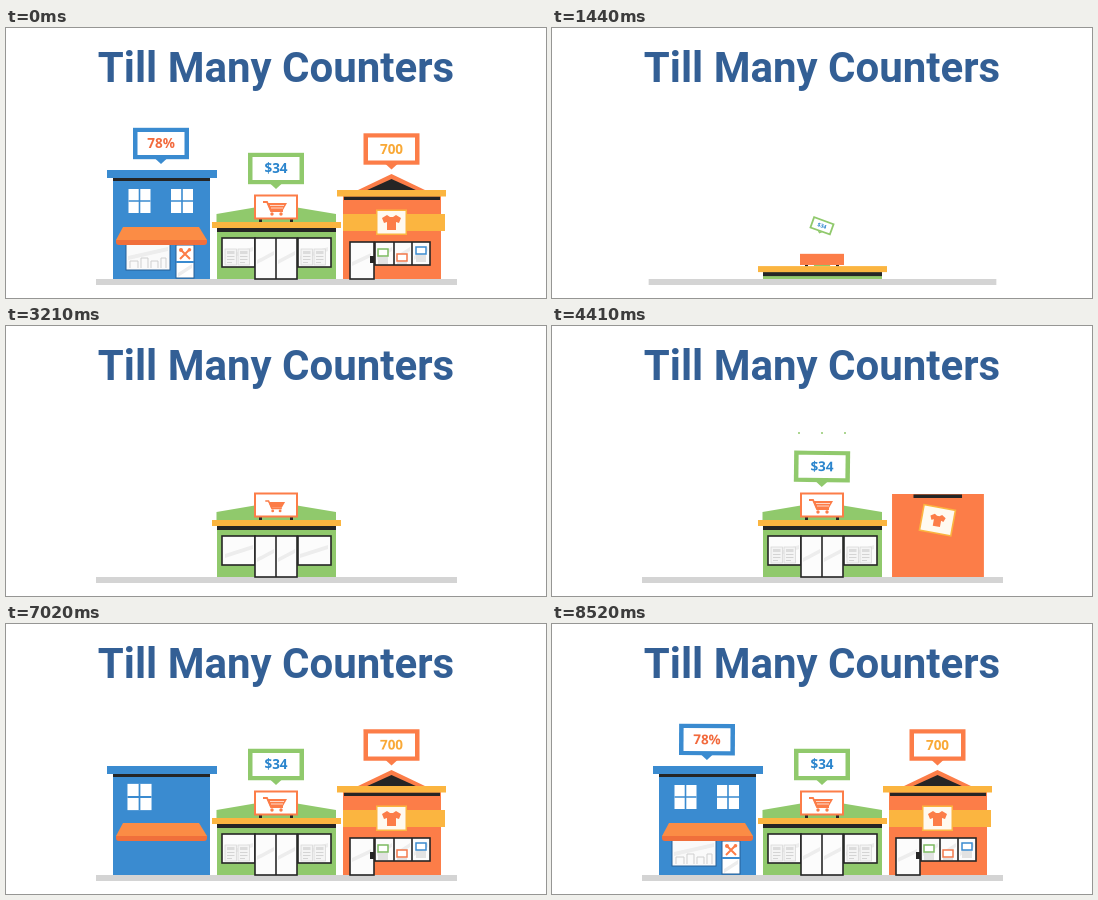
Write an HTML page that moves like this. It is 540x270 px and loops after 8550 ms.

```html
<!DOCTYPE html>
<html lang="en">
<head>
<meta charset="utf-8">
<title>Till Many Counters</title>
<style>
  html, body { margin: 0; width: 100%; height: 100%; overflow: hidden; background: #fff; }
  svg { display: block; width: 540px; height: 270px; }
  .title { font: 700 42px Roboto, sans-serif; fill: #335f95; text-anchor: middle; }
  .tag { font: 700 13.5px "Open Sans", sans-serif; text-anchor: middle; }
</style>
</head>
<body>
<svg id="stage" viewBox="0 0 540 270"></svg>
<script>
const LOOP = 8550, EMPTY = 1950, FLOOR = 251;
const BLUE = '#3a8bd0', GREEN = '#90c96c', ORANGE = '#fc7d48', YELLOW = '#fbb540', DARK = '#252525';

// Drawing helpers
const rect = (x, y, w, h, fill, more = '') =>
  `<rect x="${x}" y="${y}" width="${w}" height="${h}" fill="${fill}" ${more}/>`;
const poly = (points, fill) => `<polygon points="${points}" fill="${fill}"/>`;
const line = (d, color, width = 1) =>
  `<path d="${d}" fill="none" stroke="${color}" stroke-width="${width}"/>`;
const group = (id, ...kids) => `<g id="${id}">${kids.join('')}</g>`;

const pane = (x, y, w, h, width = 1.6) =>
  rect(x, y, w, h, '#fcfcfc', `stroke="${DARK}" stroke-width="${width}"`);
const sheen = (x, y, w) =>
  poly(`${x},${y + 9} ${x + w},${y} ${x + w},${y + 4} ${x},${y + 13}`, '#ededed');
const paper = (x, y) =>
  rect(x, y, 11.5, 16, '#f4f4f4', 'stroke="#d8d8d8" stroke-width=".8"') +
  rect(x + 2, y + 2, 7.5, 3, '#dcdcdc') +
  line(`M${x + 2} ${y + 7.5}h7.5m-7.5 3h7.5m-7.5 3h5`, '#d4d4d4');
const ticket = (x, y, color, tail) =>
  rect(x, y, 10, 7, '#fff', `stroke="${color}" stroke-width="1.5"`) +
  rect(x, y + 8, 10, tail, '#e2e2e2');
const houseWindow = x =>
  rect(x, 161, 22, 24, '#fff') + line(`M${x + 11} 161v24M${x} 173h22`, BLUE, 1.6);

const cart = line('M257 174h4l4 9h12', ORANGE, 1.8) +
  poly('261,175 281,175 277,182 264,182', ORANGE) +
  `<g fill="${ORANGE}"><circle cx="266" cy="186" r="1.7"/><circle cx="275" cy="186" r="1.7"/></g>`;
const shirt = poly('381,187 376,190 378,195 381,194 381,202 390,202 390,194 393,195 395,190 390,187 387,189 384,189', ORANGE);
const cutlery = line('M174 221l10 10M184 221l-10 10', ORANGE, 2) +
  `<g fill="${ORANGE}"><circle cx="175" cy="222" r="2"/><circle cx="183.5" cy="221.7" r="1.8"/></g>`;

const bubbles = [
  { id: 'b1', x: 155, y: 115.5, from: 150, color: BLUE, text: '78%', ink: '#f26a3d', start: 7400, end: 800, top: 'blueTop' },
  { id: 'b2', x: 270, y: 140.5, from: 192, color: GREEN, text: '$34', ink: '#2b85cd', start: 3580, end: 1220, top: 'greenTop' },
  { id: 'b3', x: 385.5, y: 121, from: 160, color: ORANGE, text: '700', ink: '#f9a937', start: 5560, end: 620, top: 'orangeTop' }
];
const bubbleArt = b => group(b.id,
  poly('-6,15 6,15 0,20.5', b.color),
  rect(-28, -15.7, 56, 31.4, b.color), rect(-23.5, -11.5, 47, 23, '#fff'),
  `<text class="tag" y="4.6" fill="${b.ink}">${b.text}</text>`);
const dotArt = b => `<g id="${b.id}dots" fill="${b.color}">` + '<circle/>'.repeat(3) + '</g>';

document.getElementById('stage').innerHTML = [
  '<text class="title" x="270" y="54">Till Many Counters</text>',
  group('ground', rect(90, 251, 361, 6, '#d4d4d4')),

  group('greenFill',
    group('greenBody', rect(211, 194, 119, 57, GREEN)),
    group('greenLeft', pane(216, 210, 33, 29), sheen(219, 219, 28)),
    group('greenRight', pane(292, 210, 33, 29), sheen(294, 219, 28)),
    group('greenPapers', paper(219, 221), paper(232, 221), paper(295, 221), paper(308, 221)),
    group('greenDoor', pane(249, 210, 42, 41), sheen(251, 223, 17), sheen(272, 223, 17),
      line('M270 210v41', DARK, 1.6))),
  group('greenTop',
    group('hump', poly('210.5,195 210.5,186 258,178 270,176.5 282,178 330,186 330,195', GREEN)),
    group('greenShade', rect(211, 200, 119, 4, DARK)),
    group('greenRoof', rect(206, 194, 129, 6, YELLOW)),
    group('cartSign', rect(253, 190, 3, 4, DARK), rect(284, 190, 3, 4, DARK),
      rect(248, 166.5, 44, 25, ORANGE),
      group('cartFace', rect(250, 168.5, 40, 21, '#fff'),
        group('cart', cart, group('cartGrid', line('M264 177.5h14M265 180h12', '#fff', .7)))))),

  group('orangeFill',
    group('orangeBody', rect(337, 168, 98, 83, ORANGE)),
    group('orangeWindow', pane(369, 214, 55, 23), line('M388 214v23M406 214v23', DARK, 1.6),
      sheen(371, 219, 15), sheen(390, 219, 14), sheen(408, 219, 14)),
    group('orangePapers', ticket(372, 221, '#7dbb62', 7), ticket(391, 226, '#f2784b', 2),
      ticket(410, 219, BLUE, 7)),
    group('orangeDoor', pane(344, 214, 24, 37), sheen(346, 225, 19), rect(364, 228, 4, 7, DARK))),
  group('orangeTop',
    group('gable', poly('350,163 385.5,146 421,163', ORANGE), poly('359,163 385.5,151 412,163', DARK)),
    group('orangeShade', rect(338, 168.5, 96, 3.5, DARK)),
    group('orangeRoof', rect(331, 162, 109, 6.5, YELLOW)),
    group('band', rect(337, 186, 102, 17, YELLOW)),
    group('shirtSign', rect(370, 181.5, 31, 25.5, YELLOW), rect(371.5, 183, 28, 22.5, '#fffaf0'),
      group('shirt', shirt))),

  group('blueFill',
    group('blueBody', rect(107, 150, 97, 101, BLUE)),
    group('blueLeft', houseWindow(122.5)),
    group('blueRight', houseWindow(165)),
    group('cafe', rect(120, 216, 44, 26, '#fafafa', 'stroke="#255f96"'), sheen(122, 219, 40),
      line('M124 240v-7h8v7m3 0v-10h7v10m3 0v-7h7v7m3 0v-10h5v10', '#cfcfcf')),
    group('cafeDoor', rect(170, 217, 18, 33, '#fff', 'stroke="#255f96"'),
      line('M170 234h18', BLUE, 2), sheen(172, 236, 14), cutlery),
    group('awning', poly('117,199 193,199 201,212 110,212', '#fb8c45'),
      '<path d="M110 212h91v2q0 3-3 3H113q-3 0-3-3z" fill="#f06f3b"/>')),
  group('blueTop',
    group('blueShade', rect(107, 150, 97, 3, DARK)),
    group('blueRoof', rect(101, 142, 110, 8, BLUE))),
  bubbles.map(b => bubbleArt(b) + dotArt(b)).join('')
].join('');

// Timing helpers
const clamp = v => Math.min(1, Math.max(0, v));
const quad = p => p < .5 ? 2 * p * p : 1 - 2 * (1 - p) ** 2;
const cubic = p => p < .5 ? 4 * p ** 3 : 1 - 4 * (1 - p) ** 3;
const back = p => 1 + 2.7 * (p - 1) ** 3 + 1.7 * (p - 1) ** 2;
const at = (t, start, length) => clamp((t - start) / length);
const leaving = t => t < EMPTY;

const el = id => document.getElementById(id);
function place(id, x, y, sx, sy, turn = 0) {
  const node = el(id);
  node.setAttribute('display', sx > .002 && sy > .002 ? 'inline' : 'none');
  node.setAttribute('transform',
    `translate(${x} ${y}) rotate(${turn}) scale(${sx} ${sy}) translate(${-x} ${-y})`);
}

// id, pivot x, pivot y, axes (s: both, w: both with a swing), start and length in, start and length out
const parts = [
  ['greenLeft', 232, 224, 's', 2850, 250, 1120, 280],
  ['greenRight', 308, 224, 's', 2900, 250, 1120, 280],
  ['greenDoor', 270, 251, 'y', 2780, 300, 1120, 280],
  ['greenPapers', 270, 229, 'y', 3300, 350, 1000, 250],
  ['hump', 270, 194, 's', 2700, 250, 1145, 400],
  ['greenShade', 270, 202, 'x', 2640, 300, 1500, 170],
  ['greenRoof', 270, 197, 'x', 2600, 300, 1520, 180],
  ['cartSign', 270, 194, 'y', 2920, 240, 1230, 400],
  ['cartFace', 270, 179, 's', 2960, 220, 1130, 270],
  ['cart', 270, 180, 's', 3135, 300, 1100, 270],
  ['cartGrid', 271, 179, 's', 3300, 250, 1100, 270],
  ['orangeWindow', 396, 225, 's', 5100, 300, 800, 250],
  ['orangeDoor', 356, 251, 'y', 4950, 300, 820, 250],
  ['orangePapers', 396, 229, 's', 6400, 350, 650, 200],
  ['gable', 385.5, 163, 'y', 4900, 320, 780, 250],
  ['orangeShade', 385.5, 169, 'x', 4230, 360, 1180, 180],
  ['orangeRoof', 385.5, 165, 'x', 4690, 320, 1200, 200],
  ['band', 385.5, 194, 'x', 4800, 320, 800, 260],
  ['shirtSign', 385.5, 194, 'w', 4200, 300, 740, 260],
  ['shirt', 385.5, 194, 's', 4345, 300, 720, 260],
  ['blueLeft', 133.5, 173, 's', 6880, 220, 820, 220],
  ['blueRight', 176, 173, 's', 7030, 220, 780, 220],
  ['cafe', 142, 229, 's', 7150, 260, 740, 240],
  ['cafeDoor', 179, 250, 'y', 7250, 260, 720, 240],
  ['awning', 155.5, 199, 'x', 6700, 300, 860, 260],
  ['blueShade', 155.5, 151, 'x', 6500, 320, 1200, 180],
  ['blueRoof', 155.5, 146, 'x', 6450, 320, 1230, 180]
];

// name, centre x, height, start in, start and length of collapse
const shops = [
  ['green', 270, 51, 2400, 1145, 400],
  ['orange', 385.5, 83, 4050, 800, 450],
  ['blue', 155.5, 101, 6060, 930, 380]
];

function drawPart(t, [id, x, y, axes, inStart, inLength, outStart, outLength]) {
  const out = leaving(t);
  const p = out ? 1 - at(t, outStart, outLength) : at(t, inStart, inLength);
  const pops = axes === 's' || axes === 'w';
  const k = !out && pops ? back(p) : quad(p);
  place(id, x, y, axes === 'y' ? 1 : k, axes === 'x' ? 1 : k, axes === 'w' ? 35 * (1 - p) : 0);
}

function drawBubble(t, b, drop) {
  let k, turn;
  if (leaving(t)) {
    k = 1 - quad(at(t, b.end, 400));
    turn = 33 * (1 - k);
  } else {
    const age = Math.max(0, t - b.start);
    k = 1 - Math.exp(-age / 180) * Math.cos(age * 2 * Math.PI / 1100);
    turn = 46 * Math.exp(-age / 240) * Math.cos(age * 2 * Math.PI / 1000);
  }
  const from = b.from + drop, node = el(b.id);
  node.setAttribute('display', k > .01 ? 'inline' : 'none');
  node.setAttribute('transform',
    `translate(${b.x} ${from + (b.y - from) * k}) rotate(${turn}) scale(${k})`);

  const p = at(t, b.start + 390, 520);
  const rise = 17.5 * (1 - (1 - p) ** 3);
  const size = p > 0 ? 2.6 * Math.min(1, (1 - p) / .4) : 0;
  [...el(b.id + 'dots').children].forEach((dot, i) => {
    dot.setAttribute('cx', b.x + (i - 1) * 23);
    dot.setAttribute('cy', b.y - 16 - rise);
    dot.setAttribute('r', size);
  });
}

function draw(t) {
  const out = leaving(t);
  place('ground', 270.5, 254, out ? 1 - cubic(at(t, 1316, 596)) : cubic(at(t, 2050, 600)), 1);

  const drops = {};
  for (const [name, x, height, start, end, length] of shops) {
    const h = out ? 1 - quad(at(t, end, length)) : 1;
    const rise = out ? 1 : quad(at(t, start, 300));
    const width = out ? 1 : .2 + .8 * quad(at(t, start, 450));
    const drop = drops[name + 'Top'] = (1 - h) * height;
    place(name + 'Body', x, FLOOR, width, rise);
    place(name + 'Fill', x, FLOOR, 1, h);
    el(name + 'Top').setAttribute('transform', `translate(0 ${drop})`);
  }
  parts.forEach(part => drawPart(t, part));
  bubbles.forEach(b => drawBubble(t, b, drops[b.top]));
}

const begin = performance.now();
function tick() {
  draw((performance.now() - begin) % LOOP);
  requestAnimationFrame(tick);
}
tick();
</script>
</body>
</html>
```
